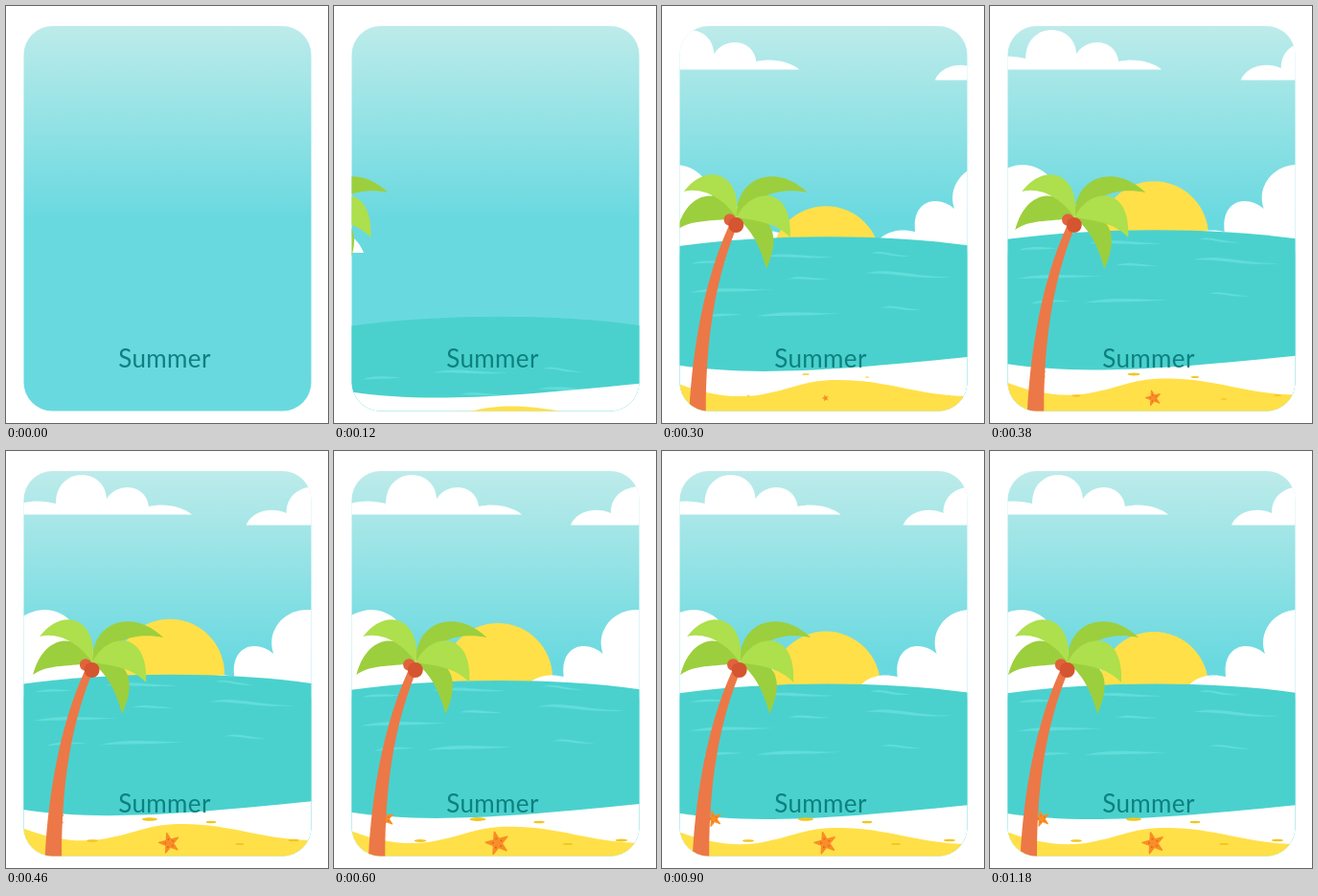
Recreate the animation shown at these times as an HTML page. Size 336 by 436 pixels, loop 2.66 s.

```html
<!DOCTYPE html>
<html lang="en">
<head>
<meta charset="utf-8">
<title>Summer</title>
<style>
html, body { margin: 0; width: 100%; height: 100%; overflow: hidden; background: #fff; }
svg { display: block; }
text { font: 26px Lato, "Open Sans", sans-serif; letter-spacing: .4px; fill: #0d8080; }
</style>
</head>
<body>
<svg width="336" height="436" viewBox="0 0 336 436">
  <defs>
    <linearGradient id="sky" gradientUnits="userSpaceOnUse" x1="0" y1="21" x2="0" y2="222">
      <stop stop-color="#bdebea"/>
      <stop offset="1" stop-color="#69d9e0"/>
    </linearGradient>
    <clipPath id="card"><rect x="18.5" y="21" width="300" height="402.500" rx="30"/></clipPath>
  </defs>
  <g clip-path="url(#card)">
    <rect width="336" height="436" fill="url(#sky)"/>
    <g id="scene">
      <path id="cloudTL" fill="#fff" d="M-10 66.500C0 52 25 50 44 55C44 16 95 16 97 50C108 32 138 34 141 58C158 54 176 58 186 66.500Z"/>
      <path id="cloudTR" fill="#fff" d="M252 77.500C258 63 278 58 294 65C294 45 310 36 330 37C350 38 360 60 360 77.500Z"/>
      <path id="cloudL" fill="#fff" d="M161 258C155 242 140 232 118 236C112 205 85 205 72 212C72 180 50 166 33 166C10 166-30 190-30 258Z"/>
      <circle id="sun" cx="171" cy="246" r="57" fill="#ffe049"/>
      <path id="cloudR" fill="#fff" d="M200 258C206 238 226 231 246 236C242 202 270 197 287 212C279 190 296 166 322 166C360 166 370 200 370 258Z"/>
      <path id="sea" fill="#4ad1ce" d="M0 256C100 240 240 239 340 256V500H0Z"/>
      <g id="waves" fill="#62ddda"></g>
      <g id="beach">
        <path fill="#fff" d="M0 376C80 390 150 388 340 368V500H0Z"/>
        <path fill="#ffe048" d="M10 395C40 408 75 416 110 408C140 402 150 394 185 394C235 394 270 411 320 411V500H10Z"/>
      </g>
      <g id="flecks" fill="#f3c520"></g>
      <g id="stars"></g>
      <g id="palm">
        <path fill="#ec7847" d="M31.500 426C35 358 47 288 72.500 231L80 234C58 290 49 350 49 426Z"/>
        <g fill="#9ccf3d">
          <path d="M81 221C110 212 132 232 112 275C106 251 96 233 81 221"/>
          <path d="M81 221C72 192 32 186 19 234C35 222 60 226 81 221"/>
          <path d="M81 221C80 176 125 165 155 195C130 190 105 195 81 221"/>
        </g>
        <g fill="#aedf4c">
          <path d="M81 221C88 178 52 160 26 194C46 189 67 201 81 221"/>
          <path d="M81 221C95 190 140 185 137 242C123 227 105 225 81 221"/>
        </g>
        <circle cx="74" cy="223.500" r="6.200" fill="#e0633c"/>
        <circle cx="80.500" cy="229" r="8" fill="#d4552f"/>
      </g>
    </g>
    <text x="165.500" y="378" text-anchor="middle">Summer</text>
  </g>
</svg>
<script>
const LOOP = 2660, RISE = 390, OVER = 0.065;
const $ = id => document.getElementById(id);

// x, y, width, end drop
const waves = [
  [30, 263, 41, -2], [103, 256, 77, 0], [217, 252, 43, 3], [212, 273, 90, 4],
  [131, 279, 44, 0], [28, 293, 89, -3], [42, 319, 42, -3], [98, 318, 88, -3], [228, 309, 44, 2]
];
$('waves').innerHTML = waves.map(([x, y, w, d]) => {
  const h = 3 + w / 25;
  return `<path d="M${x} ${y}c${w * .3} ${-h} ${w * .5} ${d - 1} ${w} ${d}` +
    `c${-w * .45} ${h * .4} ${-w * .65} ${-d - 1} ${-w} ${-d}"/>`;
}).join('');

const flecks = [[150, 385, 8, 1.8], [214, 388, 5.5, 1.2], [90, 407.5, 6, 1.3], [244, 411, 5, 1], [300, 407, 6, 1.3]];
$('flecks').innerHTML = flecks.map(([, , rx, ry]) => `<g><ellipse rx="${rx}" ry="${ry}"/></g>`).join('');

const ring = (n, radius) => Array.from({ length: n }, (_, i) => {
  const a = i * 2 * Math.PI / n - 1.83, r = radius(i);
  return [r * Math.cos(a), r * Math.sin(a)];
});
const starShape =
  `<polygon points="${ring(10, i => i % 2 ? 4.4 : 11.5)}" fill="#f98d27" stroke="#f98d27" stroke-width="1.5" stroke-linejoin="round"/>` +
  ring(5, () => 4.5).map(([x, y]) => `<circle cx="${x}" cy="${y}" r=".9" fill="#e0641f"/>`).join('');
const stars = [[170.5, 410], [54, 384.5]];
$('stars').innerHTML = [1, .72].map(k => `<g><g transform="scale(${k})">${starShape}</g></g>`).join('');

// id: start time, x offset, y offset
const slides = {
  cloudTL: [170, -170, 0], cloudTR: [208, 80, 0], cloudL: [135, -130, 0], cloudR: [135, 130, 0],
  sun: [118, 0, 210], sea: [50, 0, 155], waves: [90, 0, 165], beach: [15, 0, 70], palm: [80, -140, 0]
};

// Remaining distance: 1 at the start, slightly below 0 at the overshoot, then back to 0.
function rest(t) {
  if (t <= 0) return 1;
  if (t < RISE) return (1 + OVER) * (1 - t / RISE) ** 3 - OVER;
  return -OVER / Math.cosh((t - RISE) / 95);
}

function popIn(id, items, time, stagger) {
  items.forEach(([x, y], i) => {
    const s = 1 - rest(time - i * stagger);
    $(id).children[i].setAttribute('transform', `translate(${x} ${y}) scale(${s})`);
  });
}

function draw() {
  const now = performance.now() % LOOP;
  const t = Math.min(1180, Math.floor(now / 20) * 20);
  $('scene').style.display = t < 60 ? 'none' : '';
  for (const [id, [start, dx, dy]] of Object.entries(slides)) {
    const r = rest(t - start);
    $(id).setAttribute('transform', `translate(${dx * r} ${dy * r})`);
  }
  popIn('flecks', flecks, t - 230, 10);
  popIn('stars', stars, t - 260, 40);
  requestAnimationFrame(draw);
}
draw();
</script>
</body>
</html>
```
